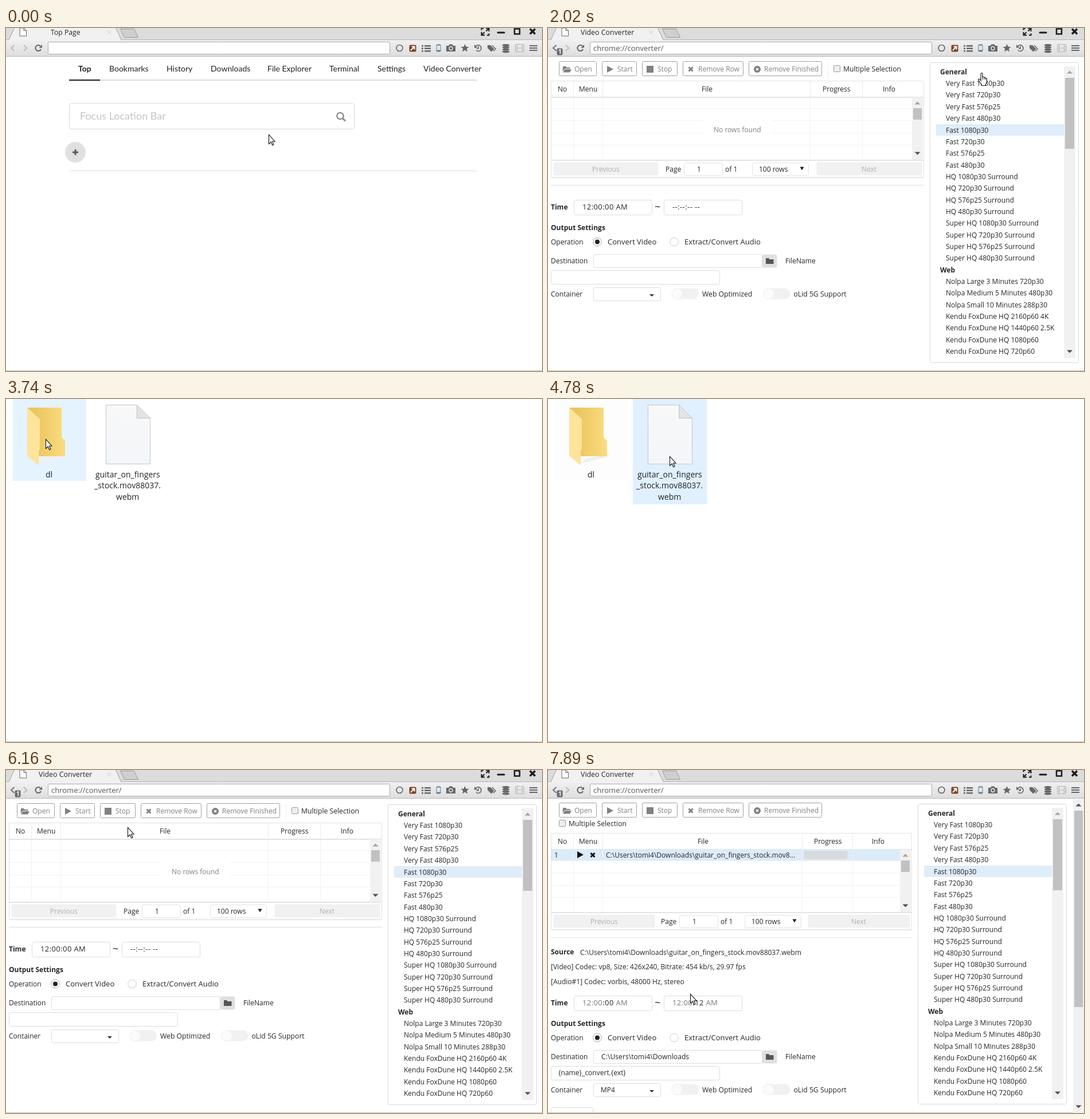
These frames come from a looping animation (935 by 599 pixels, 8000 ms). An HTML page with a canvas:

```html
<!DOCTYPE html>
<html>
<head>
<meta charset="utf-8">
<style>
html, body { margin: 0; width: 100%; height: 100%; overflow: hidden; background: #fff; }
canvas { display: block; }
</style>
</head>
<body>
<canvas id="stage" width="935" height="599"></canvas>
<script>
const g = document.getElementById('stage').getContext('2d');
const LOOP = 8000;
const CROSS = 'M-3.5-3.5L3.5 3.5M3.5-3.5L-3.5 3.5';
const FOLDER = 'M-7-5h5l1.5 2h6v2h-9l-4 5z M-3.5 0h11.5l-3 5.5h-12z';
const CLOSED = 'M-7-5h5l1.5 2h7v8h-13.5z';
const PLAY = 'M-5-6L6 0L-5 6z';
const DIR = 'C:\\Users\\tomi4\\Downloads';
const CLIP = 'guitar_on_fingers_stock.mov88037.webm';

// start, hand pointer?, x, y
const POINTER = [
  [0, 0, 458, 186], [330, 0, 639, 160], [650, 1, 739, 76], [1000, 1, 750, 78],
  [2380, 0, 459, 79], [2720, 0, 182, 74], [3070, 0, 63, 74], [3400, 0, 69, 70],
  [4450, 0, 160, 91], [4780, 0, 212, 100], [5480, 1, 208, 100], [6160, 0, 212, 100],
  [7560, 0, 221, 256], [7890, 0, 248, 391]
];

const PRESETS = ['*General'];
for (const speed of ['Very Fast', 'Fast'])
  for (const size of ['1080p30', '720p30', '576p25', '480p30']) PRESETS.push(speed + ' ' + size);
for (const q of ['HQ', 'Super HQ'])
  for (const size of ['1080p30', '720p30', '576p25', '480p30']) PRESETS.push(`${q} ${size} Surround`);
PRESETS.push('*Web', 'Nolpa Large 3 Minutes 720p30', 'Nolpa Medium 5 Minutes 480p30', 'Nolpa Small 10 Minutes 288p30');
for (const size of ['2160p60 4K', '1440p60 2.5K', '1080p60', '720p60']) PRESETS.push('Kendu FoxDune HQ ' + size);

function rect(x, y, x2, y2, color) {
  g.fillStyle = color;
  g.fillRect(x, y, x2 - x, y2 - y);
}
function box(x, y, x2, y2, fill, stroke, r = 3) {
  g.beginPath();
  g.roundRect(x + .5, y + .5, x2 - x - 1, y2 - y - 1, r);
  if (fill) { g.fillStyle = fill; g.fill(); }
  if (stroke) { g.strokeStyle = stroke; g.lineWidth = 1; g.stroke(); }
}
function shape(d, x, y, color, width) {
  const path = new Path2D(d);
  g.save();
  g.translate(x, y);
  if (width) { g.strokeStyle = color; g.lineWidth = width; g.stroke(path); }
  else { g.fillStyle = color; g.fill(path); }
  g.restore();
}
function disc(x, y, r, fill, stroke, width = 1) {
  g.beginPath();
  g.arc(x, y, r, 0, 7);
  if (fill) { g.fillStyle = fill; g.fill(); }
  if (stroke) { g.strokeStyle = stroke; g.lineWidth = width; g.stroke(); }
}
// y is the visual middle of the line
function text(s, x, y, { size = 12, color = '#262626', bold = '', align = 'left', face = '"Open Sans", "Noto Sans"', gap = 0 } = {}) {
  g.font = `${bold} ${size}px ${face}, sans-serif`;
  g.letterSpacing = gap + 'px';
  const width = g.measureText(s).width;
  g.fillStyle = color;
  g.fillText(s, align === 'center' ? Math.round(x - width / 2) : x, Math.round(y + size * .34));
  return width;
}
function fade(y, y2, a, b) {
  const f = g.createLinearGradient(0, y, 0, y2);
  f.addColorStop(0, a);
  f.addColorStop(1, b);
  return f;
}

function browserBar(t) {
  rect(0, 0, 935, 21, '#dcdcdc');
  rect(0, 20, 935, 21, '#b4b4b4');
  rect(0, 21, 935, 49, fade(21, 49, '#f0f0f0', '#dedede'));
  rect(0, 49, 935, 50, '#b5b5b5');
  shape('M5 21L15-1H191L201 21z', 0, 0, '#f1f1f1');
  shape('M5 20.5L15-1M191-1L201 20.5', 0, 0, '#a0a0a0', 1);
  shape('M199.500 1.500H223.500L230.500 16.500H206.500z', 0, 0, '#cfcfcf');
  shape('M199.500 1.500H223.500L230.500 16.500H206.500z', 0, 0, '#9b9b9b', 1);
  shape('M24 0V14H35.500V4.500L31 0zM31 0V4.500H35.500', 0, 0, '#fff');
  shape('M24 0V14H35.500V4.500L31 0zM31 0V4.500H35.500', 0, 0, '#666', 1);
  shape('M-3-3L3 3M3-3L-3 3', 180, 7.5, '#c8c8c8', 1);
  if (t < 1350) text('Top Page', 78, 7.5, { size: 12.2 });
  else text('Video Converter', 57, 7.5, { size: 12.4 });

  shape('M1-6H6.500V-.5M6.500-6L1.500-1M-1 6H-6.500V.5M-6.500 6L-1.500 1M-6.500-3V-6H-3M6.500 3V6H3', 836, 6.5, '#1c1c1c', 2);
  box(856, 6, 871, 10, '#1c1c1c', 0, 2);
  shape('M887 1.500H896V10.500H887z', 0, 0, '#1c1c1c', 2.5);
  shape('M-4.500-4.500L4.500 4.500M4.500-4.500L-4.500 4.500', 918.5, 6, '#1c1c1c', 3.5);

  const visited = t >= 1000;
  shape('M3-5L-2.500 0L3 5', 11.5, 35, visited ? '#777' : '#bbb', 2);
  shape('M-3-5L2.500 0L-3 5', 34, 35, '#bbb', 2);
  if (visited) {
    box(15, 35, 26, 48, '#6d6d6d', 0, 2);
    text('1', 20.5, 41.5, { size: 10, bold: 'bold', color: '#fff', align: 'center' });
  }
  if (visited && t < 1670) shape('M-4.500-4.500L4.500 4.500M4.500-4.500L-4.500 4.500', 57, 35, '#666', 2.5);
  else {
    shape('M4.500 2A5 5 0 1 1 3.500-3.500', 56.5, 35, '#666', 2);
    shape('M6-6V-.5H.5z', 57, 35, '#666');
  }
  box(73, 24, 670, 46, '#fff', '#ababab', 1);
  if (t >= 650) text('chrome://converter/', 79, 35.5, { size: 13, color: '#555' });
  toolIcons('#666');
}

function toolIcons(c) {
  disc(686.5, 35, 5.5, 0, c, 1.6);
  box(703, 29, 716, 42, '#7c4526', 0, 2);
  shape('M-3.500 3.500L2 -2M-2-3H3V2', 709.5, 35.5, '#fff', 2);
  for (let y = 30; y < 42; y += 4.5) {
    rect(725, y, 728, y + 2.5, c);
    rect(730, y, 741, y + 2.5, c);
  }
  box(750, 28, 759, 42, '#6a7c8c', 0, 2);
  rect(751.5, 30.5, 757.5, 38.5, '#dcebf5');
  shape('M768 31H772L773.500 28.500H778.500L780 31H784V41H768z', 0, 0, c);
  disc(776, 35.5, 3, c, '#eee', 1.3);
  shape('M0-7L2-2.300L7-2L3.200 1.300L4.500 6.500L0 3.600L-4.500 6.500L-3.200 1.300L-7-2L-2-2.300z', 800.5, 35, c);
  shape('M-4.500-3A5.300 5.300 0 1 1 -4 4M0-3V1H-3', 824, 35, c, 1.7);
  shape('M-7-6V-.5H-1.500z', 824, 35, c);
  shape('M-8-5H-3L3.500 1.500L-1.500 6.500L-8 0zM-1-5H1L7 1.500L2.500 6L1.500 5L5 1.500z', 848, 35, c);
  for (let y = 30; y < 43; y += 3.8) {
    g.beginPath();
    g.ellipse(872, y, 6.5, 2, 0, 0, 7);
    g.fillStyle = c;
    g.fill();
  }
  box(888, 28, 904, 42, 0, '#b5b5b5', 1);
  shape('M891.500 28V42M900.500 28V42M891 35H901M888 32H891M888 38H891M901 32H904M901 38H904', 0, 0, '#b5b5b5', 1);
  for (const y of [30, 34, 38]) rect(913, y, 927, y + 2, c);
}

function topPage() {
  const lato = { face: 'Lato', size: 14, color: '#222' };
  rect(110, 90, 821, 92, '#dcdcdc');
  rect(110, 90, 164, 92, '#1b1c1d');
  const names = ['Top', 'Bookmarks', 'History', 'Downloads', 'File Explorer', 'Terminal', 'Settings', 'Video Converter'];
  [126, 180, 280, 357, 456, 564, 648, 728].forEach((x, i) =>
    text(names[i], x, 71, { ...lato, bold: i ? '' : 'bold' }));
  box(110, 131, 608, 177, '#fff', '#d8d8d8', 4);
  text('Focus Location Bar', 129, 154, { face: 'Lato', size: 18, color: '#c4c4c4' });
  disc(583, 153.5, 5.7, 0, '#8a8a8a', 2.3);
  shape('M587 157.500L592 162.500', 0, 0, '#8a8a8a', 3);
  disc(121, 217, 18, '#e0e0e0');
  shape('M-5 0H5M0-5V5', 121, 217, '#5c5c5c', 3);
  rect(110, 249, 821, 250, '#dcdcdc');
}

function scrollbar(x, y, y2, thumb, thumb2, w = 20) {
  rect(x, y, x + w, y2, '#f1f1f1');
  rect(x + 2, thumb, x + w - 2, thumb2, '#c1c1c1');
  shape('M-5 2.500H5L0-2.500z', x + w / 2, y + 10, y > 60 ? '#a3a3a3' : '#505050');
  shape('M-5-2.500H5L0 2.500z', x + w / 2, y2 - 11, '#505050');
}

function button(name, icon, x, x2, level) {
  box(x, 58, x2, 84, '#fff', '#a0a0a0', 2);
  if (level) {
    g.globalAlpha = level;
    box(x, 58, x2, 84, '#7e868e', '#7e868e', 2);
    g.globalAlpha = 1;
  }
  const color = level > .8 ? '#fff' : '#808080';
  if (icon === 'stop') rect(x + 8, 66, x + 20, 78, color);
  else if (icon === 'round') {
    disc(x + 15, 72, 6, color);
    shape('M-2-2L2 2M2-2L-2 2', x + 15, 72, '#fff', 1.7);
  } else shape(icon, x + 14, 72, color, icon === CROSS ? 3 : 0);
  text(name, x + 27, 72, { color });
}

function buttons(t) {
  const during = (a, b) => t >= a && t < b;
  button('Open', FOLDER, 19, 85, during(3070, 5480) ? 1 : during(5480, 5810) ? .7 : 0);
  button('Start', PLAY, 94, 155, 0);
  button('Stop', 'stop', 164, 226, during(2720, 3070) ? 1 : 0);
  button('Remove Row', CROSS, 235, 341, during(2720, 3070) ? .3 : 0);
  button('Remove Finished', 'round', 350, 478, during(2380, 2720) ? .2 : 0);
}

function table(loaded) {
  const dy = loaded ? 19 : 0, right = loaded ? 635 : 656, bar = right - 21;
  const cols = loaded ? [44, 95, 443, 531] : [44, 95, 457, 548];
  const mids = loaded ? [25, 70, 270, 488, 576] : [25, 70, 277, 503, 595];
  const faint = '#f3f3f3';
  g.save();
  g.translate(0, dy);
  rect(5, 261, right, 263, '#f4f4f4');
  box(5, 92, right, 261, '#fff', '#e2e2e2', 0);
  rect(6, 120, right - 1, 122, '#e3e3e3');
  if (loaded) rect(6, 120, bar, 141, '#dcebf8');
  for (const y of [140, 161, 183, 204]) rect(6, y, bar, y + 1, faint);
  for (const x of cols) {
    rect(x, 93, x + 1, 120, '#ececec');
    rect(x, 122, x + 1, 230, faint);
  }
  ['No', 'Menu', 'File', 'Progress', 'Info'].forEach((s, i) => text(s, mids[i], 106.5, { align: 'center' }));
  scrollbar(bar, 121, 230, 140, 160, 19);
  if (loaded) {
    text('1', 11, 130.5);
    shape(PLAY, 56, 130, '#111');
    shape(CROSS, 78, 130.5, '#111', 3);
    text(`${DIR}\\${CLIP.slice(0, 28)}...`, 101, 130.5);
    box(446, 123, 523, 138, '#d9dadb', 0, 3);
  } else {
    rect(270, 160, 390, 194, '#fff');
    text('No rows found', 330, 177.5, { color: '#808080', align: 'center' });
  }

  rect(5, 230, right, 232, '#e4e4e4');
  const [prev, page, select, next] = loaded ? [187, 197, 343, 453] : [193, 205, 356, 468];
  box(9, 234, prev, 258, '#f1f1f1', 0, 3);
  text('Previous', (9 + prev) / 2, 247, { color: '#b0b0b0', align: 'center' });
  text('Page', page, 247);
  box(page + 32, 235, page + 100, 258, '#fff', '#e2e2e2');
  text('1', page + 58, 247, { align: 'center' });
  text('of 1', page + 104, 247);
  box(select, 235, select + 99, 258, '#fff', '#e2e2e2');
  text('100 rows', select + 12, 247);
  shape('M-3.500-3H3.500L0 3z', select + 87, 245.5, '#222');
  box(next, 234, right - 3, 258, '#f1f1f1', 0, 3);
  text('Next', (next + right - 3) / 2, 247, { color: '#b0b0b0', align: 'center' });
  rect(5, 274, right, 275, '#dcdcdc');
  g.restore();
}

function time(x, y, head, tail, end, split) {
  const opts = { size: 13, gap: .4 }, grey = split ? '#777' : '#262626';
  x += text(head, x, y, { ...opts, color: grey });
  x += text(tail, x, y, opts);
  text(end, x, y, { ...opts, color: grey });
}

function toggle(x, name) {
  box(x, 454, x + 48, 474, '#f1f1f1', 0, 10);
  disc(x + 10, 464, 9.5, '#fbfbfb', '#eee');
  text(name, x + 53.5, 465, { size: 12.2 });
}

function settings(loaded) {
  if (loaded) {
    text('Source', 5, 319, { bold: 'bold' });
    text(`${DIR}\\${CLIP}`, 56, 319.5);
    text('[Video] Codec: vp8, Size: 426x240, Bitrate: 454 kb/s, 29.97 fps', 5, 345);
    text('[Audio#1] Codec: vorbis, 48000 Hz, stereo', 5, 370.5);
  }
  g.save();
  g.translate(0, loaded ? 95 : 0);
  text('Time', 5, 313, { bold: 'bold' });
  box(45, 300, 182, 327, '#fff', '#dcdcdc');
  box(202, 300, 339, 327, '#fff', '#dcdcdc');
  time(60, 313, '12:00', ':00', ' AM', loaded);
  text('~', 186, 313, { size: 18 });
  if (loaded) time(217, 313, '12:00', ':12', ' AM', true);
  else text('--:--:-- --', 217, 313, { size: 13, gap: .4 });
  text('Output Settings', 5, 348.5, { bold: 'bold' });
  text('Operation', 5, 374);
  disc(86, 373.5, 7.3, '#fff', '#aaa');
  disc(86, 373.5, 4, '#222');
  text('Convert Video', 104, 374, { size: 13 });
  disc(220, 373.5, 7.3, '#fff', '#ccc');
  text('Extract/Convert Audio', 238, 374, { size: 13 });
  text('Destination', 5, 407);
  box(79, 395, 374, 419, '#fff', '#dcdcdc');
  box(373, 395, 400, 419, '#e0e0e0', 0, 3);
  shape(CLOSED, 387, 407, '#555');
  text('FileName', 414, 407);
  box(5, 423, 300, 448, '#fff', '#dcdcdc');
  text('Container', 5, 465);
  box(79, 453, 197, 477, '#fff', '#dcdcdc');
  shape('M-4-2H4L0 2z', 181, 467, '#333');
  toggle(215.5, 'Web Optimized');
  toggle(375, 'oLid 5G Support');
  if (loaded) {
    text(DIR, 93, 407, { size: 12.2 });
    text('{name}_convert.{ext}', 18, 435);
    text('MP4', 92, 465);
    box(5, 495, 79, 520, '#fff', '#dcdcdc');
  }
  g.restore();
}

function presets() {
  box(666, 60, 926, 585, '#fff', '#d8d8d8');
  rect(677, 168, 900, 188, '#dfecfa');
  PRESETS.forEach((s, i) => {
    const y = 76.7 + i * 20.35;
    if (s[0] === '*') text(s.slice(1), 684, y, { bold: 'bold' });
    else text(s, 694, y);
  });
  scrollbar(900, 67, 576, 87, 211);
}

function converter(t) {
  const loaded = t >= 6500;
  g.save();
  if (t >= 7890) g.translate(0, -1);
  buttons(t);
  const [cx, cy] = loaded ? [19, 94] : [498, 71];
  box(cx, cy - 6, cx + 12, cy + 6, '#eee', '#999', 1);
  text('Multiple Selection', cx + 17, cy + 1, { size: 12.2 });
  if (!loaded) rect(488, 58, 489, 85, '#eee');
  table(loaded);
  settings(loaded);
  if (loaded) g.translate(-21, 0);
  presets();
  g.restore();
  if (loaded) scrollbar(916, 51, 599, 71, 414, 19);
}

function fileGrid(picked) {
  rect(12, 0, 140, 143, picked ? '#fdfdfd' : '#e5f3ff');
  if (picked) rect(148, 0, 277, 184, '#e0f0fe');
  const gold = g.createLinearGradient(50, 0, 103, 0);
  gold.addColorStop(0, '#ebc55f');
  gold.addColorStop(1, '#fbdc80');
  shape('M57 113L66 104L108 96L103 101z', 0, 0, '#f0f0ee');
  shape('M37 15H97V67L103 73V100H44z', 0, 0, gold);
  shape('M37 15L59 35V88L57 90V116L37 99z', 0, 0, '#fee39b');
  text('dl', 75, 132, { size: 14, align: 'center', color: '#222' });
  const page = 'M174.500 10.500H228.500L251.500 33.500V113.500H174.500z';
  shape(page, 0, 0, fade(10, 113, '#f8f8f9', '#f3f6f9'));
  shape(page, 0, 0, '#c4c7c9', 1);
  shape('M228.500 10.500V33.500H251.500z', 0, 0, '#e2e4e5');
  shape('M228.500 10.500V33.500H251.500z', 0, 0, '#bfc2c4', 1);
  [CLIP.slice(0, 17), CLIP.slice(17, 33), CLIP.slice(33)].forEach((s, i) =>
    text(s, 212.5, 132 + i * 19.5, { size: 14, align: 'center', color: '#222' }));
}

// closing file window, almost transparent
function fadingFiles() {
  g.save();
  g.globalAlpha = .2;
  for (const y of [68, 125, 153]) shape('M-5 5L-1 1M-4-2L3 5L3 2L6-2L1-6L-1-3z', 5, y, '#888');
  text('s', -1, 211, { size: 13 });
  text('ea', 0, 240, { size: 13 });
  text('ea', 0, 268, { size: 13 });
  rect(0, 385, 15, 401, '#eee');
  g.translate(25, 13);
  g.scale(.97, .97);
  fileGrid(true);
  g.restore();
}

function pointer(t) {
  const [, hand, x, y] = POINTER.findLast(p => p[0] <= t);
  const d = hand
    ? 'M5 14V2Q5 .5 6.500.5T8 2V8Q8 7 9.500 7T11 9Q11 8 12.300 8.300T13.500 10Q15.500 9.500 15.500 11.500V15Q15.500 18 13.500 20V22.500H6V20Q4 18 1 13.500Q0 11.500 1.500 11T5 14z'
    : 'M.5.5V16.500L4.300 13L6.700 18.700L9 17.700L6.700 12H11z';
  shape(d, x, y, '#fff');
  shape(d, x, y, '#111', 1.1);
  if (hand) shape('M8 8V12M11 9V12M13.500 10V12', x, y, '#111', 1);
}

function draw(now) {
  const t = now % LOOP;
  rect(0, 0, 935, 599, '#fff');
  if (t >= 3740 && t < 5480) fileGrid(t >= 4450);
  else {
    browserBar(t);
    if (t < 1350) topPage();
    else if (t >= 2020) converter(t);
    if (t >= 5480 && t < 5810) fadingFiles();
  }
  rect(0, 598, t >= 6500 ? 916 : 935, 599, '#c2c2c2');
  pointer(t);
}

const start = performance.now();
function tick() {
  draw(performance.now() - start);
  requestAnimationFrame(tick);
}
tick();
</script>
</body>
</html>
```
